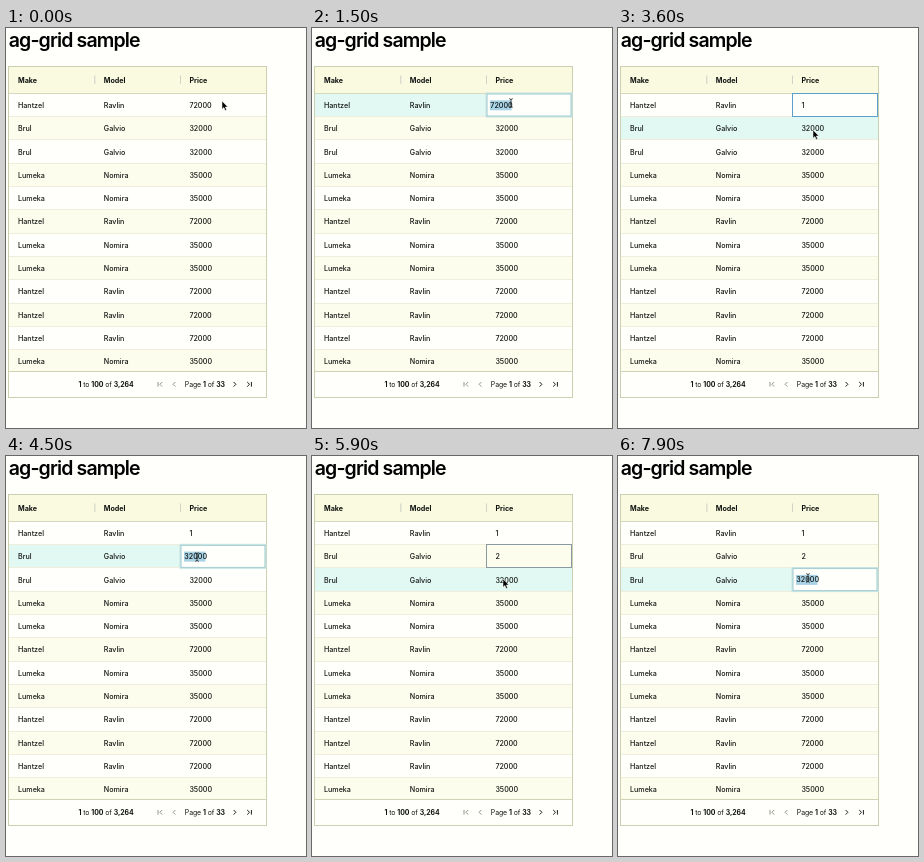
An HTML page for the animation above (8 s loop, 300 by 400 pixels).

```html
<!DOCTYPE html>
<html lang="en">
<head>
<meta charset="utf-8">
<title>ag-grid sample</title>
<style>
  html, body { margin: 0; width: 100%; height: 100%; overflow: hidden; background: #fffffb; }
  svg { display: block; width: 300px; height: 400px; }
  text { font: 500 7.15px Inter, "Liberation Sans", sans-serif; fill: #101410; white-space: pre; }
  .title { font-size: 19.5px; font-weight: 600; letter-spacing: -.85px; fill: #000; }
  .bold { font-weight: 700; }
  .paging { font-size: 6.9px; font-weight: 400; letter-spacing: -.06px; }
  .icon { fill: none; stroke: #181d1f; stroke-width: 1; }
  .off { stroke: #92948c; }
</style>
</head>
<body>
<svg id="stage" viewBox="0 0 300 400"></svg>
<script>
const LOOP = 8000, TOP = 65.3, ROW = 23.3, LEFT = 2.5, RIGHT = 260.5;
const COLS = [12, 97.8, 183.4], CELL = 174.5;
const stage = document.getElementById('stage');

function add(tag, attrs, content = '') {
  const el = document.createElementNS('http://www.w3.org/2000/svg', tag);
  for (const key in attrs) el.setAttribute(key, attrs[key]);
  el.innerHTML = content;
  return stage.appendChild(el);
}
const box = (x, y, width, height, fill, more) => add('rect', { x, y, width, height, fill, ...more });
const label = (x, y, s, cls = '') => add('text', { x, y, class: cls }, s);
const show = (el, on) => el.setAttribute('visibility', on ? 'visible' : 'hidden');
const rowTop = i => TOP + i * ROW;

const cars = {
  H: ['Hantzel', 'Ravlin', '72000'],
  B: ['Brul', 'Galvio', '32000'],
  L: ['Lumeka', 'Nomira', '35000']
};
const data = [...'HBBLLHLLHHHL'].map(k => cars[k]);

label(2.7, 19.4, 'ag-grid sample', 'title');

// Row backgrounds, hover strip and lines
data.forEach((_, i) => box(LEFT, rowTop(i), RIGHT - LEFT, ROW, i % 2 ? '#fdfdee' : '#fffffb'));
const hover = box(LEFT, 0, RIGHT - LEFT, ROW, '#e2f8f2');
data.forEach((_, i) => box(LEFT, Math.floor(rowTop(i + 1)), RIGHT - LEFT, 1, '#eeeedb'));
box(LEFT, 38.5, RIGHT - LEFT, TOP - 38.5, '#fafae0');
box(LEFT, 65, RIGHT - LEFT, 1, '#d6d9bd');

['Make', 'Model', 'Price'].forEach((s, i) => {
  label(COLS[i], 54.5, s, 'bold');
  if (i) box(COLS[i] - 9.4, 47.5, .9, 8.5, '#cbcec2');
});
const prices = data.map((car, i) =>
  car.map((s, c) => label(COLS[c], rowTop(i) + 14.6, s))[2]);

// Paging panel
box(LEFT, 343.3, RIGHT - LEFT, 26.5, '#fffffb');
box(LEFT, 343, RIGHT - LEFT, 1, '#d0d3b4');
const strong = s => `<tspan class="bold">${s}</tspan>`;
label(72.4, 358.9, `${strong(1)} to ${strong(100)} of ${strong('3,264')}`, 'paging');
label(178.8, 358.9, `Page ${strong(1)} of ${strong(33)}`, 'paging');
const icon = (d, cls = '') => add('path', { d, class: 'icon ' + cls });
icon('M156.2 354l-2.3 2.3 2.3 2.3M152 354v4.6', 'off');
icon('M169.4 354l-2.3 2.3 2.3 2.3', 'off');
icon('M227.6 354l2.3 2.3-2.3 2.3');
icon('M241.2 354l2.3 2.3-2.3 2.3M245.4 354v4.6');
box(LEFT, 38.5, RIGHT - LEFT, 331, 'none', { stroke: '#cdd0b0' });

// Focus outline, cell editor and pointers
const focus = box(CELL, 0, 85, 23, 'none');
const editor = add('g', {});
editor.append(
  box(CELL, .2, 85, 23, '#fffffb', { stroke: '#c4e4e4', 'stroke-width': 2 }),
  box(CELL + .5, .7, 84, 22, 'none', { stroke: '#9fc4ca', 'stroke-width': .6 }));
const mark = box(178, 7, 21.5, 10, '#a8d2e6');
const input = label(178.3, 14.6, '');
const caret = box(183, 7.3, .6, 9, '#181d1f');
editor.append(mark, input, caret);

const arrow = add('path', {
  d: 'M0 0V8.2L1.9 6.5 3.2 9.5 4.6 8.9 3.3 6H5.8Z',
  fill: '#000', stroke: '#fff', 'stroke-width': .5
});
const beam = add('path', {
  d: 'M-1.8-4.3Q0-4.3 0-3V3Q0 4.3-1.8 4.3M1.8-4.3Q0-4.3 0-3M0 3Q0 4.3 1.8 4.3M-1 1H1',
  fill: 'none', stroke: '#222', 'stroke-width': .8
});

const path = [
  [0, 216, 73], [900, 199, 75], [2700, 199, 75], [3100, 199, 87], [3600, 195, 102],
  [3900, 191, 101], [4900, 191, 101], [5300, 191, 109], [5900, 191, 123],
  [6400, 190, 122], [LOOP, 190, 122]
];
const edits = [
  { row: 0, focus: 800, open: 1000, type: 2000, close: 2600, value: '1' },
  { row: 1, focus: 3800, open: 4000, type: 4600, close: 5000, value: '2' },
  { row: 2, focus: 6300, open: 6500, type: LOOP, close: LOOP, value: '' }
];

function pointer(t) {
  const i = path.findIndex(p => p[0] > t);
  const [t0, x0, y0] = path[i - 1], [t1, x1, y1] = path[i];
  const u = (t - t0) / (t1 - t0), k = u * u * (3 - 2 * u);
  return [x0 + (x1 - x0) * k, y0 + (y1 - y0) * k];
}

function draw(t) {
  const [x, y] = pointer(t);
  hover.setAttribute('y', rowTop(Math.floor((y - TOP) / ROW)));
  show(hover, t >= 100);

  const active = edits.find(e => t >= e.open && t < e.close);
  const focused = edits.filter(e => t >= e.focus).pop();
  show(focus, focused && !active);
  if (focused) {
    focus.setAttribute('y', Math.floor(rowTop(focused.row)) + .5);
    focus.setAttribute('stroke', focused.row ? '#899a9e' : '#5c9fca');
  }

  edits.forEach(e => {
    prices[e.row].textContent = t >= e.close ? e.value : data[e.row][2];
  });
  editor.setAttribute('display', active ? 'inline' : 'none');
  if (active) {
    const typed = t >= active.type;
    editor.setAttribute('transform', `translate(0 ${rowTop(active.row)})`);
    input.textContent = typed ? active.value : data[active.row][2];
    show(mark, !typed);
    show(caret, typed);
  }

  for (const el of [arrow, beam]) {
    el.setAttribute('transform', `translate(${x} ${y})`);
    show(el, (el === beam) === !!active);
  }
}

function tick(now) {
  draw(now % LOOP);
  requestAnimationFrame(tick);
}
draw(0);
requestAnimationFrame(tick);
</script>
</body>
</html>
```
